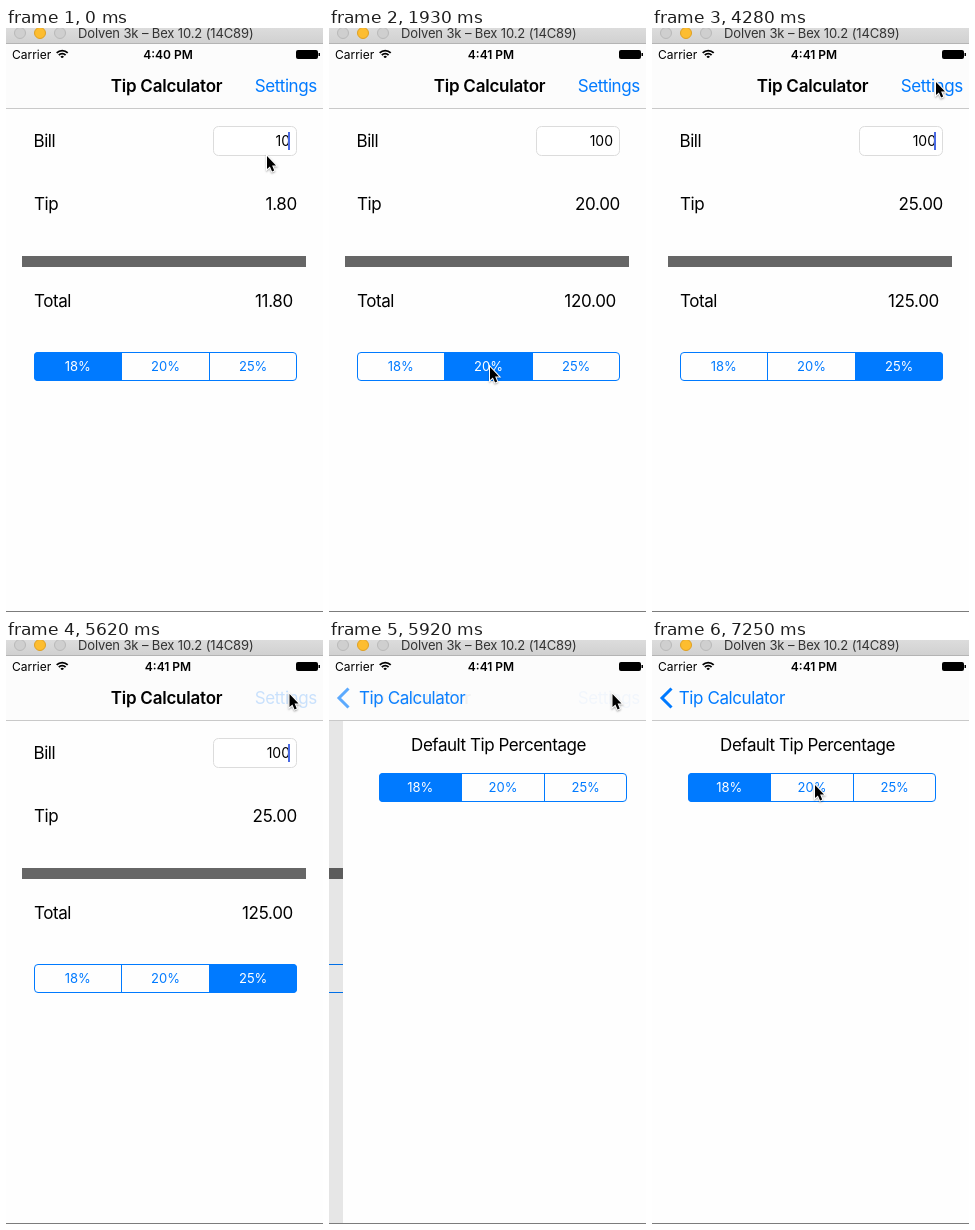
These frames come from a looping animation (317x584 px, 7990 ms). An HTML page with a canvas:

```html
<!DOCTYPE html>
<html lang="en">
<head>
<meta charset="utf-8">
<title>Tip Calculator</title>
<style>
html, body { margin: 0; width: 317px; height: 584px; overflow: hidden; background: #fefefe; }
canvas { display: block; }
</style>
</head>
<body>
<canvas id="stage" width="317" height="584"></canvas>
<script>
const W = 317, H = 584, LOOP = 7990, TICK = 147.6;
const BLUE = '#007aff', PAGE = '#fefefe', BAR = '#fcfcfc';
const c = document.getElementById('stage').getContext('2d');

// Pointer stops: tick, x, y
const POINTER = [
  [0, 261, 128], [4, 261, 128], [9, 161, 339], [14, 161, 339], [18, 246, 344], [19, 246, 344],
  [22, 286, 209], [23, 302, 76], [24, 302, 76], [25, 288, 49], [28, 288, 49], [29, 284, 54],
  [32, 284, 54], [33, 283.5, 54], [44, 283.5, 54], [49, 163, 145], [54, 163, 145]
];
const CARET_FADES = [5, 12, 18, 25, 32];
const PUSH = { 39: 0.36, 40: 14 / W, 41: 0.005 };

function text(s, x, y, { size = 17, weight = 400, align = 'left', color = '#000', gap = size === 17 ? -0.45 : 0, alpha = 1 } = {}) {
  c.save();
  c.globalAlpha *= alpha;
  c.font = `${weight} ${size}px Inter, sans-serif`;
  c.letterSpacing = gap + 'px';
  c.textAlign = align;
  c.fillStyle = color;
  c.fillText(s, x, y);
  c.restore();
}

function amount(value, x, y) {
  text(value.toFixed(2), x, y, { align: 'right', gap: -0.3 });
}

function rect(x, y, w, h, color) {
  c.fillStyle = color;
  c.fillRect(x, y, w, h);
}

function rounded(x, y, w, h, r, stroke, fill) {
  c.beginPath();
  c.roundRect(x, y, w, h, r);
  if (fill) { c.fillStyle = fill; c.fill(); }
  if (stroke) { c.strokeStyle = stroke; c.lineWidth = 1; c.stroke(); }
}

function segments(x, y, w, selected, pressed = -1) {
  const edge = i => x + Math.floor(w * i / 3);
  c.save();
  c.beginPath();
  c.roundRect(x, y, w, 29, 4);
  c.clip();
  if (pressed >= 0) rect(edge(pressed), y, w / 3 + 1, 29, '#d9ebff');
  rect(edge(selected), y, edge(selected + 1) - edge(selected) + 1, 29, BLUE);
  c.restore();
  rounded(x + 0.5, y + 0.5, w - 1, 28, 3.5, BLUE);
  for (const i of [1, 2]) rect(edge(i), y, 1, 29, BLUE);
  ['18%', '20%', '25%'].forEach((label, i) =>
    text(label, x + w * (i + 0.5) / 3, y + 19, { size: 13, align: 'center', color: i === selected ? '#fff' : BLUE }));
}

function caretAlpha(k) {
  const start = CARET_FADES.find(f => k >= f && k < f + 4);
  return start === undefined ? 1 : [0.5, 0, 0, 0.5][k - start];
}

function calculator(k) {
  const bill = k < 1 ? 10 : 100;
  const choice = k < 12 ? 0 : k < 19 ? 1 : 2;
  const pressed = k === 11 ? 1 : k === 18 ? 2 : -1;
  const tip = bill * [0.18, 0.2, 0.25][choice];
  text('Bill', 27.5, 119);
  text('Tip', 28, 182);
  text('Total', 28, 279);
  rounded(207.5, 98.5, 83, 29, 5, '#dcdcdc', '#fff');
  text(bill, 284, 118, { size: 14, align: 'right' });
  c.save();
  c.globalAlpha = caretAlpha(k);
  rect(282, 104, 2, 18, '#4969e3');
  c.restore();
  amount(tip, 291, 182);
  rect(16, 228, 284, 11, '#666');
  amount(bill + tip, 287, 279);
  segments(28, 324, 263, choice, pressed);
}

function settings() {
  rect(0, 80, W, H, PAGE);
  text('Default Tip Percentage', 155.5, 111, { align: 'center' });
  segments(36, 133, 248, 0);
}

function navBar(k, left) {
  rect(0, 15, W, 65, BAR);
  rect(0, 80, W, 1, '#c9c9c9');
  const shown = 1 - left;
  text('Tip Calculator', 160.5 - 78 * shown, 64, { weight: 600, align: 'center', gap: -0.22, alpha: left });
  text('Tip Calculator', 26.7 + 75 * left, 64, { color: BLUE, alpha: shown, gap: -0.4 });
  text('Settings', 310.7, 64, { align: 'right', color: BLUE, alpha: k < 38 ? 1 : 0.2 * Math.sqrt(left) });
  c.save();
  c.globalAlpha = shown ** 10;
  c.strokeStyle = BLUE;
  c.lineWidth = 3;
  c.beginPath();
  c.moveTo(19.5, 48.5);
  c.lineTo(10, 58);
  c.lineTo(19.5, 67.5);
  c.stroke();
  c.restore();
}

function statusBar(k) {
  text('Carrier', 6, 31, { size: 12 });
  text(k < 6 ? '4:40 PM' : '4:41 PM', 162, 31, { size: 12, weight: 600, align: 'center' });
  c.strokeStyle = '#000';
  c.lineWidth = 1.8;
  for (const r of [7.8, 4.8, 1.6]) {
    c.beginPath();
    c.arc(56.2, 30.5, r, -Math.PI * 0.75, -Math.PI * 0.25);
    c.stroke();
  }
  rounded(290, 22, 22, 9, 2, null, '#000');
  rect(312.5, 25, 1.5, 3, '#000');
}

function windowBar() {
  const shade = c.createLinearGradient(0, 0, 0, 15);
  shade.addColorStop(0, '#dcdcdc');
  shade.addColorStop(1, '#d1d1d1');
  rect(0, 0, W, 15, shade);
  rect(0, 15, W, 1, '#b4b4b4');
  [['#cfcfcf', '#b9b9b9'], ['#fdbd30', '#dfa023'], ['#cfcfcf', '#b9b9b9']].forEach(([fill, line], i) =>
    rounded(8.5 + 20 * i, -0.5, 11, 11, 5.5, line, fill));
  text('Dolven 3k – Bex 10.2 (14C89)', 72, 10, { size: 13, color: '#333', gap: -0.13 });
}

function pointer(k) {
  const i = POINTER.findIndex(p => p[0] > k);
  const [k0, x0, y0] = POINTER[i - 1], [k1, x1, y1] = POINTER[i];
  const u = (k - k0) / (k1 - k0), e = u * u * (3 - 2 * u);
  c.save();
  c.translate(x0 + (x1 - x0) * e, y0 + (y1 - y0) * e);
  const arrow = new Path2D('M0 0V13L2.9 10.4L5.1 15.4L7.2 14.5L5.1 9.6H9Z');
  c.shadowColor = 'rgba(0,0,0,.35)';
  c.shadowBlur = 2;
  c.shadowOffsetY = 1;
  c.strokeStyle = '#fff';
  c.lineWidth = 2;
  c.stroke(arrow);
  c.shadowColor = 'transparent';
  c.fillStyle = '#000';
  c.fill(arrow);
  c.restore();
}

function draw(time) {
  const k = Math.min(53, Math.floor((time % LOOP) / TICK + 0.06));
  const left = k < 39 ? 1 : PUSH[k] || 0; // share of the push still to go
  rect(0, 0, W, H, PAGE);
  if (left > 0) {
    c.save();
    c.translate(-96 * (1 - left), 0);
    calculator(k);
    c.restore();
    rect(0, 80, W, H, `rgba(0,0,0,${0.1 * (1 - left)})`);
  }
  if (left < 1) {
    c.save();
    c.translate(Math.round(W * left), 0);
    settings();
    c.restore();
  }
  navBar(k, left);
  statusBar(k);
  windowBar();
  rect(0, 583, W, 1, '#7c7c7c');
  pointer(k);
}

const begin = performance.now();
function loop() {
  draw(performance.now() - begin);
  requestAnimationFrame(loop);
}
loop();
</script>
</body>
</html>
```
